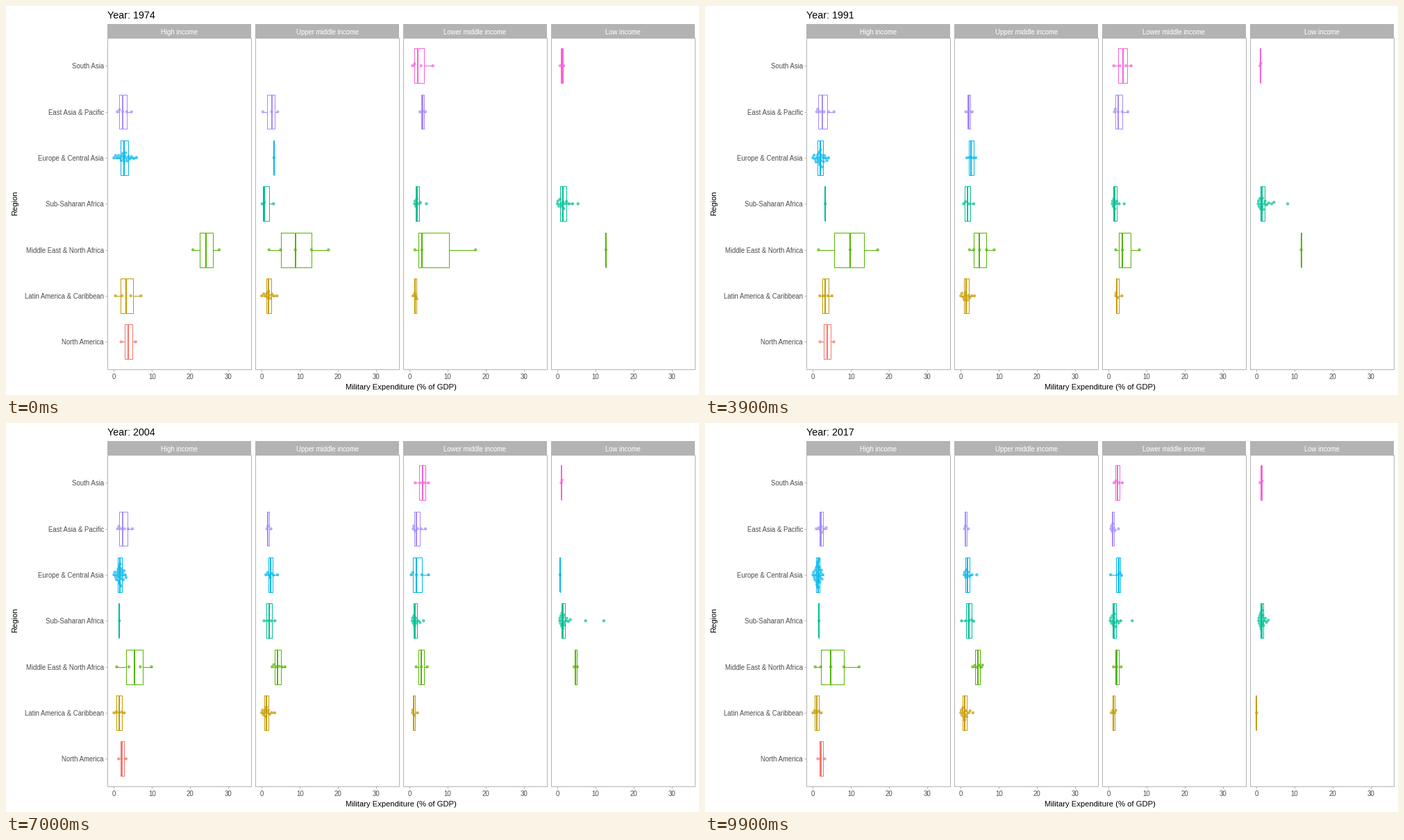
Animation, 998 px wide and 561 px high, one loop 10 s. Source, as a matplotlib script:

```python
import numpy as np
import matplotlib.pyplot as plt
from matplotlib.animation import FuncAnimation
from matplotlib.collections import LineCollection
from matplotlib.patches import Rectangle

W, H, DPI = 998, 561, 100
PX = 72 / DPI  # points per pixel
FRAMES, INTERVAL = 100, 100
SPAN = FIRST, LAST = 1974, 2017

LEFT, TOP, BOTTOM = 146, 46, 523.5
PANEL_W, PITCH = 207.4, 212.9
UNIT, ZERO = 5.495, 9.4
ROW0, ROW_STEP, HALF_BOX = 86.2, 66.35, 24.9
DOT, GAP = 4.4, 4.0
GREY, TEXT = "#b3b3b3", "#4d4d4d"

INCOMES = ["High income", "Upper middle income", "Lower middle income", "Low income"]
REGIONS = [
    ("South Asia", "#fb61d7"),
    ("East Asia & Pacific", "#a58aff"),
    ("Europe & Central Asia", "#00b6eb"),
    ("Sub-Saharan Africa", "#00c094"),
    ("Middle East & North Africa", "#53b400"),
    ("Latin America & Caribbean", "#c49a00"),
    ("North America", "#f8766d"),
]
HIGH, UPPER, LOWER, LOW = range(4)
SAS, EAP, ECA, SSA, MENA, LAC, NAM = range(7)


class Group:
    """Dots between a low, middle and high value that drift over the years."""

    def __init__(self, col, row, count, *keys, span=SPAN):
        self.col, self.row, self.span = col, row, span
        self.count = np.broadcast_to(count, 2)
        self.keys = np.array([np.broadcast_to(k, 3) for k in keys], float)
        self.times = np.linspace(*span, len(keys))

    def dots(self, year):
        if not self.span[0] <= year <= self.span[1]:
            return None
        n = int(np.interp(year, self.span, self.count) + 0.5)
        lo, mid, hi = (np.interp(year, self.times, k) for k in self.keys.T)
        if n == 1 or hi - lo < 0.01:
            return np.full(n, mid)
        p = np.linspace(0, 1, n)
        if n > 6:  # large groups crowd around the middle
            s = 2 * p - 1
            p = 0.5 + s * (1 + s ** 2) / 4
        return lo + (hi - lo) * p ** -np.log2((mid - lo) / (hi - lo))


# column, row, dot count (first, last), then (low, middle, high) at even steps
GROUPS = [
    Group(HIGH, EAP, (5, 7), (.9, 2.3, 4.6), (1, 2.4, 5.8), (.9, 2.2, 3.5)),
    Group(HIGH, ECA, (19, 25), (0, 2.7, 5.9), (0, 1.7, 3.6), (0, 1.3, 2.6)),
    Group(HIGH, SSA, 1, 5, 2.5, 1.3, 1.6, span=(1983, LAST)),
    Group(HIGH, MENA, (2, 5), (20.7, 24.2, 27.6), (2.2, 11.5, 21.1),
          (.9, 8.5, 14), (.7, 4.8, 9), (.6, 4.7, 12.1)),
    Group(HIGH, LAC, (4, 5), (.4, 3.2, 7.1), (2.2, 3.7, 5.5), (0, 1.4, 2.8),
          (0, 1, 2.2)),
    Group(HIGH, NAM, 2, (1.9, 3.8, 5.7), (2, 4, 6), (1.2, 2.2, 3.2), (1.3, 2.2, 3.1)),

    Group(UPPER, EAP, 3, (.3, 2.6, 4.2), (1.6, 1.9, 2.7), (1, 1.2, 2)),
    Group(UPPER, ECA, (1, 9), 3.2, (1.2, 2.6, 4.1), (.9, 1.7, 4.2)),
    Group(UPPER, SSA, (3, 5), (.1, .7, 3.1), (.9, 1.9, 3.5), (.2, 2.1, 3.4)),
    Group(UPPER, MENA, (5, 6), (1.9, 8.8, 17.5), (2.4, 3.9, 6.4), (3.1, 4.5, 5.7)),
    Group(UPPER, LAC, (11, 13), (0, 1.8, 4), (0, 1.3, 3.5), (0, 1, 3.2)),

    Group(LOWER, SAS, 4, (.75, 2, 6.1), (1.5, 4.2, 5.9), (1.4, 2.3, 3.6)),
    Group(LOWER, EAP, (3, 7), (2.7, 3.4, 4.1), (1.2, 2.2, 5.3), (.6, 1.1, 2.6)),
    Group(LOWER, ECA, (5, 4), (.8, 2, 3.2), (.4, 1.8, 5), (.5, 2.7, 3.4),
          span=(1992, LAST)),
    Group(LOWER, SSA, (7, 13), (1.3, 1.9, 4.4), (.9, 1.5, 4), (.4, 1.4, 3.2)),
    Group(LOWER, MENA, 3, (1.4, 3.2, 17.3), (2, 3.8, 5.6), (1.3, 2.1, 3.3)),
    Group(LOWER, LAC, 4, (.9, 1.5, 1.9), (2.1, 2.4, 3.8), (.8, .9, 2.1),
          (.7, 1.3, 1.9)),

    Group(LOW, SAS, 2, (.7, 1.1, 1.7), 1, (.95, 1.2, 1.5)),
    Group(LOW, ECA, 1, 1.2, .65, .95, span=(1992, 2014)),
    Group(LOW, SSA, (13, 17), (0, 1.4, 5.4), (.6, 1.5, 3.6), (.6, 1.4, 3.1)),
    Group(LOW, MENA, (1, 2), 12.7, 14.2, (4.7, 5.1, 5.6), (3.5, 3.9, 4.3),
          span=(FIRST, 2014)),
    Group(LOW, LAC, 1, .05, span=(1994, 1998)),
    Group(LOW, LAC, 1, .05, span=(2016, LAST)),
]

# Short spending peaks of single dots: year and height
PEAKS = {
    (HIGH, ECA): [(1995.2, 9)],
    (LOWER, SSA): [(2017, 6.2)],
    (LOW, SSA): [(1986, 29.1), (1993.3, 21.5), (1999, 34.3), (2003, 21)],
}


def outliers(col, row, year):
    peaks = PEAKS.get((col, row), [])
    vals = [max(h * np.exp(-((year - c) / 1.9) ** 2) for c, h in peaks)] if peaks else []
    if (col, row) == (LOW, SSA):
        vals.append(3 + 5.5 * np.sin(np.pi * (year - FIRST) / (LAST - FIRST)))
    return vals


def box_stats(v):
    """Whisker ends and quartiles, whiskers limited to 1.5 IQR."""
    q1, med, q3 = np.quantile(v, [0.25, 0.5, 0.75])
    reach = 1.5 * (q3 - q1) + 1e-9
    inside = v[(v >= q1 - reach) & (v <= q3 + reach)]
    return min(inside.min(), q1), q1, med, q3, max(inside.max(), q3)


def px(col, v):
    return LEFT + PITCH * col + ZERO + UNIT * np.asarray(v)


def py(row):
    return ROW0 + ROW_STEP * row


def swarm(xs):
    """Vertical offsets that keep the dots from overlapping."""
    placed = []
    for x in xs:
        near = [(x - a, b) for a, b in placed if abs(x - a) < GAP]
        options = [0.0]
        for dx, b in near:
            rise = np.sqrt(GAP ** 2 - dx ** 2)
            options += [b - rise, b + rise]
        for y in sorted(options, key=abs):
            if all(dx ** 2 + (y - b) ** 2 >= GAP ** 2 - 1e-6 for dx, b in near):
                placed.append((x, y))
                break
    return np.array([y for _, y in placed])


plt.rcParams["font.family"] = "Liberation Sans"
fig = plt.figure(figsize=(W / DPI, H / DPI), dpi=DPI, facecolor="white")
ax = fig.add_axes([0, 0, 1, 1])
ax.set(xlim=(0, W), ylim=(H, 0))
ax.axis("off")


def label(x, y, s, size=9.7, color=TEXT, ha="center", **kw):
    return ax.text(x, y, s, fontsize=size * PX, color=color, ha=ha,
                   va="baseline", **kw)


def tick(xs, ys):
    ax.plot(xs, ys, color=GREY, lw=PX, solid_capstyle="butt")


for c, income in enumerate(INCOMES):
    x = LEFT + PITCH * c
    ax.add_patch(Rectangle((x, 26), PANEL_W, 20, fc=GREY, ec="none"))
    ax.add_patch(Rectangle((x, TOP), PANEL_W, BOTTOM - TOP, fc="white",
                           ec=GREY, lw=PX))
    label(x + PANEL_W / 2, 40.7, income, color="white")
    for v in range(0, 40, 10):
        tick([px(c, v)] * 2, [BOTTOM, BOTTOM + 3])
        label(px(c, v), 537.7, v)
for r, (region, _) in enumerate(REGIONS):
    tick([LEFT - 3, LEFT], [py(r)] * 2)
    label(LEFT - 5, py(r) + 4, region, ha="right")
label(LEFT + (3 * PITCH + PANEL_W) / 2, 553.3, "Military Expenditure (% of GDP)",
      11.25, "black")
label(16, 284.5, "Region", 11.25, "black", rotation=90, rotation_mode="anchor")
title = label(LEFT, 18, "", 14.2, "black", ha="left")

boxes = ax.add_collection(LineCollection([], linewidths=PX, zorder=3))
medians = ax.add_collection(LineCollection([], linewidths=2 * PX, zorder=4))
dots = ax.scatter([], [], s=(DOT * PX) ** 2, linewidths=0, alpha=0.7, zorder=5)


def update(i):
    year = FIRST + (LAST - FIRST) * i / (FRAMES - 1)
    lines, line_colors, mids, mid_colors, spots, spot_colors = ([] for _ in range(6))
    for g in GROUPS:
        vals = g.dots(year)
        if vals is None:
            continue
        color, y = REGIONS[g.row][1], py(g.row)
        lo, q1, med, q3, hi = px(g.col, box_stats(vals))
        t, b = y - HALF_BOX, y + HALF_BOX
        lines += [[(lo, y), (q1, y)], [(q3, y), (hi, y)],
                  [(q1, t), (q3, t), (q3, b), (q1, b), (q1, t)]]
        line_colors += [color] * 3
        mids.append([(med, t), (med, b)])
        mid_colors.append(color)
        lone = [v for v in outliers(g.col, g.row, year) if v > vals[-1]]
        xs = px(g.col, np.sort(np.append(vals, lone)))
        spots += list(zip(xs, y + swarm(xs)))
        spot_colors += [color] * len(xs)
    boxes.set_segments(lines)
    boxes.set_color(line_colors)
    medians.set_segments(mids)
    medians.set_color(mid_colors)
    dots.set_offsets(spots)
    dots.set_facecolor(spot_colors)
    title.set_text(f"Year: {round(year)}")
    return boxes, medians, dots, title


anim = FuncAnimation(fig, update, frames=FRAMES, interval=INTERVAL,
                     init_func=lambda: update(0), repeat=True, repeat_delay=0)
plt.show()
```
